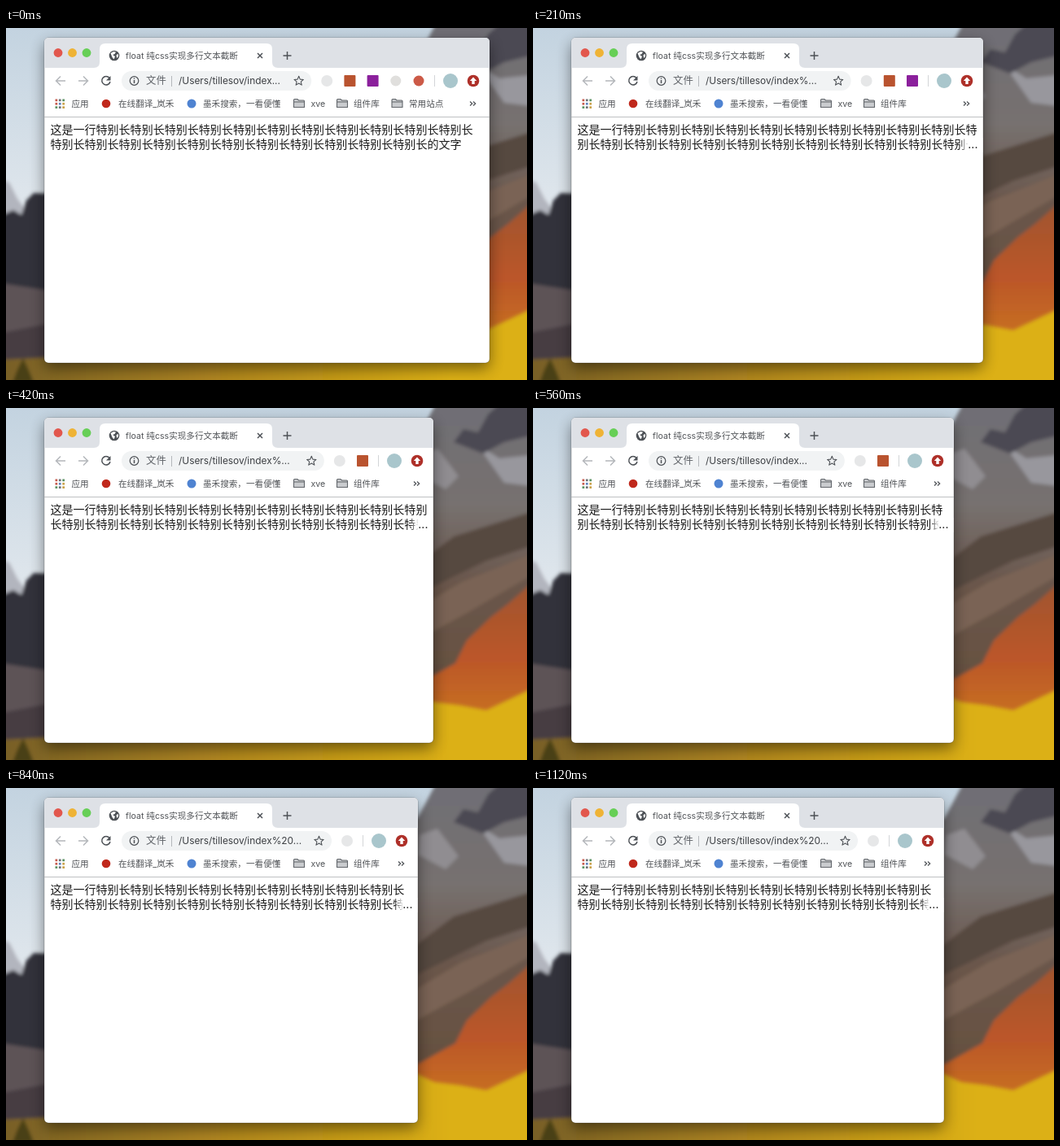
An HTML page for the animation above (1190 ms loop, 640 by 433 pixels).

```html
<!DOCTYPE html>
<html lang="zh-CN">
<head>
<meta charset="utf-8">
<title>float 纯css实现多行文本截断</title>
<style>
  html, body { margin: 0; width: 100%; height: 100%; overflow: hidden; }
  svg { display: block; width: 100%; height: 100%; }
  text { font-family: Inter, "Noto Sans CJK SC", "Noto Sans CJK", sans-serif; white-space: pre; }
  .label { font-size: 10.6px; fill: #505357; }
  .url { font-size: 11.9px; fill: #3c3f43; }
  .page { font-size: 14.04px; fill: #1c1c1c; }
  .line { fill: none; stroke: #4d5156; stroke-width: 1.5; }
</style>
</head>
<body>
<svg viewBox="0 0 640 433" xmlns="http://www.w3.org/2000/svg">
  <defs>
    <linearGradient id="sky" x2="0" y2="1">
      <stop offset="0" stop-color="#c3d3e0"/><stop offset=".5" stop-color="#dfe6ec"/>
    </linearGradient>
    <linearGradient id="rock" x2="0" y2="1">
      <stop offset="0" stop-color="#6f6e75"/><stop offset=".28" stop-color="#77716f"/><stop offset=".5" stop-color="#6a564b"/><stop offset=".8" stop-color="#65503f"/>
    </linearGradient>
    <linearGradient id="autumn" x2="0" y2="1">
      <stop offset="0" stop-color="#a0542f"/><stop offset=".5" stop-color="#bc5729"/><stop offset="1" stop-color="#cc7a1e"/>
    </linearGradient>
    <linearGradient id="gold">
      <stop offset="0" stop-color="#775f26"/><stop offset=".4" stop-color="#b08620"/><stop offset=".85" stop-color="#dcb012"/>
    </linearGradient>
    <linearGradient id="fade">
      <stop offset="0" stop-color="#fff" stop-opacity="0"/><stop offset="1" stop-color="#fff"/>
    </linearGradient>
    <filter id="soft"><feGaussianBlur stdDeviation="2"/></filter>
    <filter id="shadowBlur" x="-20%" y="-20%" width="140%" height="140%"><feGaussianBlur stdDeviation="9"/></filter>
    <clipPath id="frame"><rect class="window" x="47" y="12" height="400" rx="5"/></clipPath>
    <g id="folder" fill="#c9cbce" stroke="#62666b" stroke-width="1.1">
      <path d="M.5 1.5Q.5.5 1.5.5H5L6.5 2H12.500Q13.500 2 13.500 3V10.500H.5Z"/><path d="M.5 4H13.500"/>
    </g>
  </defs>

  <!-- Landscape -->
  <rect width="640" height="433" fill="url(#sky)"/>
  <g filter="url(#soft)">
    <path fill="#b2b5be" d="M-5 187L4 190L14 210L26 226V240H-5Z"/>
    <path fill="#30313a" d="M-5 230L9 224L19 230L25 212L34 203L60 204V330H-5Z"/>
    <path fill="#5d5357" d="M-5 314L20 318L60 324V420H-5Z"/>
    <path fill="#473e42" d="M-5 375L60 362V425H-5Z"/>
    <path fill="url(#rock)" d="M528-5H645V440H440V90L506 36Z"/>
    <path fill="#98979d" d="M578 44L606 62L645 58V96L612 92Z"/>
    <path fill="#908d91" d="M508 58L530 50L556 84L540 100L506 82Z"/>
    <path fill="#4b4a52" d="M550 42L562 26L580 30L592 8L606-5H645V34L612 42L586 56Z"/>
    <path fill="#564840" d="M500 196L550 158L645 128V170L590 188L500 232Z"/>
    <path fill="#7a6454" d="M500 250L560 214L645 180V206L570 250L500 288Z"/>
    <path fill="url(#autumn)" d="M645 216L618 240L596 257L566 286L552 314L500 343V405H645Z"/>
    <path fill="url(#gold)" d="M-5 408L80 404L440 382L500 350L526 362L558 366L590 372L645 346V440H-5Z"/>
    <path fill="#4a4119" d="M8 436L14 420L21 406L28 421L34 436Z"/>
  </g>

  <rect class="window" x="47" y="19" height="400" rx="6" opacity=".45" filter="url(#shadowBlur)"/>
  <rect class="window" x="47" y="12" height="400" rx="5" fill="#fff" stroke="#000" stroke-opacity=".22"/>

  <g clip-path="url(#frame)">
    <!-- Tab strip -->
    <rect x="47" y="12" width="560" height="37" fill="#dee1e6"/>
    <path fill="#fff" d="M108 49Q115 49 115 42V26Q115 19 122 19H320Q327 19 327 26V42Q327 49 334 49Z"/>
    <circle cx="64" cy="30.500" r="5.400" fill="#e2574d"/>
    <circle cx="81.500" cy="30.500" r="5.400" fill="#efb335"/>
    <circle cx="99" cy="30.500" r="5.400" fill="#66cf56"/>
    <circle cx="133" cy="34" r="6.300" fill="#4d5156"/>
    <path fill="#fff" d="M128.500 31L132 29L135 29.500L133.500 32L131 33L134 35L132.500 38.500L130.500 36ZM135.500 33L138 32V35L136 37Z"/>
    <text class="label" x="147" y="37.900">float 纯css实现多行文本截断</text>
    <path class="line" d="M309 31L315 37M315 31L309 37" stroke-width="1.300"/>
    <path class="line" d="M340.500 34H350.500M345.500 29V39"/>

    <!-- Toolbar -->
    <g class="line">
      <path stroke="#b4b7bb" d="M73 65H61.500M67 59.500L61.500 65L67 70.500M89 65H100.500M95 59.500L100.500 65L95 70.500"/>
      <path d="M127 61.500A5.200 5.200 0 1 0 128 66"/>
    </g>
    <path fill="#4d5156" d="M128.500 59V64.500H123Z"/>
    <rect id="omnibox" x="142" y="53" height="24" rx="12" fill="#f1f3f4"/>
    <circle class="line" cx="157.500" cy="65" r="5.300" style="stroke-width:1.200"/>
    <path class="line" d="M157.500 64V68M157.500 61.500V62.800"/>
    <text x="172" y="69.400" font-size="12.400" fill="#5f6368">文件</text>
    <path d="M203.500 59V72" stroke="#b5b8bc"/>
    <text class="url" id="address" x="212" y="69.300"></text>
    <path class="line" id="star" style="stroke-width:1.100" stroke-linejoin="round"/>
    <g id="extensions">
      <circle cy="65" r="7" fill="#e6e7e8"/>
      <rect x="-7" y="58" width="14" height="14" rx="1" fill="#b9532f"/>
      <rect x="-7" y="58" width="14" height="14" rx="1" fill="#8b209c"/>
      <circle cy="65" r="6.500" fill="#e0dfdd"/>
      <circle cy="65" r="6.500" fill="#cc5a47"/>
    </g>
    <g id="controls">
      <path d="M-67.500 58V72" stroke="#d3d5d8"/>
      <circle cx="-48" cy="65" r="9" fill="#a9c6cc"/>
      <circle cx="-20" cy="65" r="7.300" fill="#ae3029"/>
      <path fill="#fff" d="M-20 60.500L-15.800 65H-18.300V69H-21.700V65H-24.200Z"/>
      <path class="line" d="M-24 90.500L-21.300 93L-24 95.500M-20 90.500L-17.300 93L-20 95.500" style="stroke-width:1.200"/>
    </g>

    <!-- Bookmarks -->
    <g id="apps"></g>
    <circle cx="123" cy="93" r="5.300" fill="#c0281c"/>
    <circle cx="228" cy="93" r="5.500" fill="#4f83d1"/>
    <use href="#folder" x="353" y="87"/>
    <use href="#folder" x="406" y="87"/>
    <g class="label">
      <text x="80.500" y="96.800">应用</text>
      <text x="138" y="96.800">在线翻译_岚禾</text>
      <text x="242" y="96.800">墨禾搜索，一看便懂</text>
      <text x="374.500" y="96.800">xve</text>
      <text x="427" y="96.800">组件库</text>
    </g>
    <g id="lastFolder">
      <use href="#folder" x="473.500" y="87"/>
      <text class="label" x="495" y="96.800">常用站点</text>
    </g>
    <path d="M47 109.500H607" stroke="#bfc1c3"/>

    <!-- Page -->
    <text class="page" id="line1" x="54.400" y="130.200"></text>
    <text class="page" id="line2" x="54.400" y="148.100"></text>
    <g id="more">
      <rect x="-22" y="135" width="11" height="18" fill="url(#fade)"/>
      <rect x="-11.700" y="135" width="18" height="18" fill="#fff"/>
      <text class="page" x="-11.700" y="148.100">...</text>
    </g>
  </g>
</svg>
<script>
const STEP = 70;
// Right edge of the window as it is dragged narrower.
const EDGES = [594, 580, 566, 553, 541, 532, 525, 520, 517, 514, 512, 509, 506, 505.8, 505.5, 505.2, 505];
const CHAR = 14.04, LEFT = 54.4, ICON_GAP = 28.2;
const COPY = "这是一行" + "特别长".repeat(22) + "的文字";

const $ = id => document.getElementById(id);
const windows = document.querySelectorAll(".window");
const icons = [...$("extensions").children];
const move = (el, x) => el.setAttribute("transform", `translate(${x} 0)`);
const show = (el, on) => el.setAttribute("visibility", on ? "visible" : "hidden");

const dotColors = ["#c4594c", "#6d7175", "#5b9262", "#c4594c", "#5b80bd", "#c9a14a", "#5b9262", "#6d7175", "#c9a14a"];
$("apps").innerHTML = dotColors.map((color, i) =>
  `<rect x="${60.5 + i % 3 * 4.4}" y="${87.5 + Math.floor(i / 3) * 4.4}" width="2.7" height="2.7" fill="${color}"/>`).join("");

function starPath(cx, cy) {
  const points = Array.from({ length: 10 }, (_, i) => {
    const r = i % 2 ? 2.7 : 6, a = i * Math.PI / 5;
    return `${(cx + r * Math.sin(a)).toFixed(2)} ${(cy - r * Math.cos(a)).toFixed(2)}`;
  });
  return `M${points.join("L")}Z`;
}

function layoutToolbar(edge) {
  const count = Math.min(icons.length, Math.floor((edge - 87 - 393.5) / ICON_GAP) + 1);
  const first = edge - 87 - (count - 1) * ICON_GAP;
  icons.forEach((icon, i) => {
    show(icon, i < count);
    move(icon, first + i * ICON_GAP);
  });
  $("omnibox").setAttribute("width", first - 19 - 142);
  $("star").setAttribute("d", starPath(first - 34.5, 65.3));
  const suffix = first > 416 ? "%20" : first > 412 ? "%2" : first > 403 ? "%" : "";
  $("address").textContent = `/Users/tillesov/index${suffix}...`;
  move($("controls"), edge);
  show($("lastFolder"), edge > 572);
}

function layoutPage(edge) {
  const right = edge - 7;
  const perLine = Math.floor((right - LEFT) / CHAR);
  $("line1").textContent = COPY.slice(0, perLine);
  $("line2").textContent = COPY.slice(perLine, perLine * 2);
  show($("more"), COPY.length > perLine * 2);
  move($("more"), right);
}

function render(ms) {
  const edge = EDGES[Math.floor(ms / STEP) % EDGES.length];
  windows.forEach(el => el.setAttribute("width", edge - 47));
  layoutToolbar(edge);
  layoutPage(edge);
}

const start = performance.now();
function tick() {
  render(performance.now() - start);
  requestAnimationFrame(tick);
}
tick();
</script>
</body>
</html>
```
